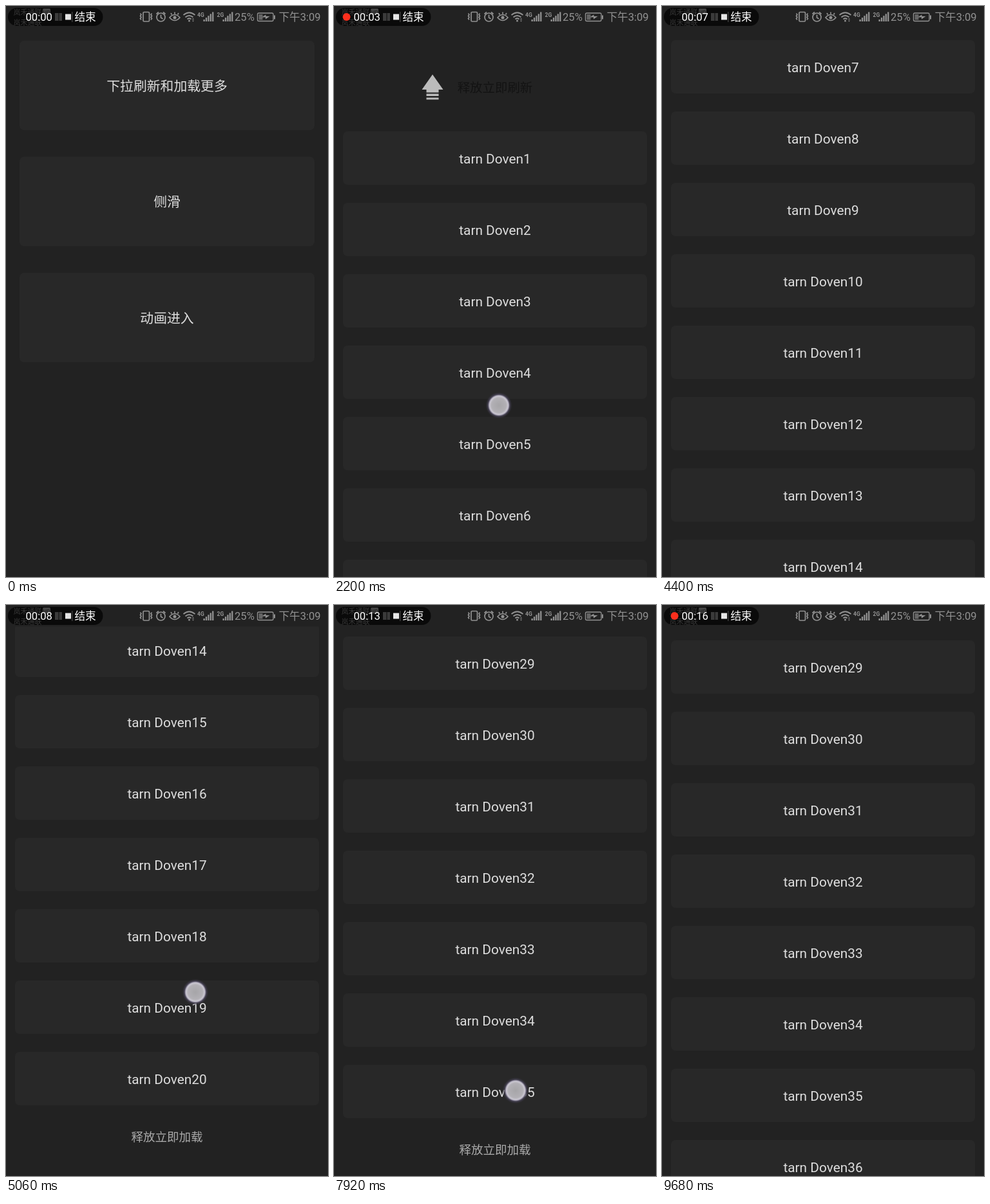
Write an HTML page that moves like this. It is 500 px wide and 888 px high and loops after 9900 ms.

```html
<!DOCTYPE html>
<html lang="zh-CN">
<head>
<meta charset="utf-8">
<title>下拉刷新</title>
<style>
  html, body { margin: 0; width: 100%; height: 100%; overflow: hidden; background: #222; }
  svg { display: block; width: 100vw; height: 100vh; }
  text { font-family: Roboto, "Noto Sans CJK SC", "Noto Sans CJK", sans-serif; }
  .mid { text-anchor: middle; }
  .card { fill: #282828; }
  .label { fill: #dedede; font-size: 20.83px; text-anchor: middle; }
  .head { fill: #131313; font-size: 19.44px; text-anchor: middle; }
  .foot { fill: #aaa; font-size: 18.52px; }
  .bar { fill: #929292; font-size: 16.6px; }
  .net { fill: #929292; font-size: 8.5px; font-weight: 700; }
  .carrier { fill: #383838; font-size: 11px; }
  .rec { fill: #fff; font-size: 16.6px; }
  .line { fill: none; stroke: #929292; stroke-width: 1.7; }
</style>
</head>
<body>
<svg viewBox="0 0 500 888" preserveAspectRatio="none">
  <defs>
    <radialGradient id="glow">
      <stop offset="0" stop-color="#a6a5a8"/>
      <stop offset=".55" stop-color="#b2b0b5"/>
      <stop offset=".7" stop-color="#cbc8d2"/>
      <stop offset=".77" stop-color="#8a8598"/>
      <stop offset=".82" stop-color="#4b4758" stop-opacity=".9"/>
      <stop offset="1" stop-color="#302d3c" stop-opacity="0"/>
    </radialGradient>
  </defs>
  <rect width="500" height="888" fill="#222"/>
  <g id="menu"></g>
  <g id="page">
    <rect width="500" height="888" fill="#222"/>
    <g id="header">
      <g id="arrow" fill="#bbb">
        <path d="M0-20.5 16.5 3H9.5V7.5H-9.5V3H-16.5Z"/>
        <path d="M-9.5 9.5h19v3.5h-19zM-9.5 15.5h19v3h-19z"/>
      </g>
      <g id="headSpin"></g>
      <text id="headText" class="head" x="250" y="7"></text>
    </g>
    <g id="rows"></g>
    <g id="footer">
      <g id="footSpin"></g>
      <text id="footText" class="foot" y="7"></text>
    </g>
  </g>
  <rect width="500" height="33.5" fill="#222"/>

  <g id="status">
    <rect x="3" y="3" width="147.5" height="28" rx="14" fill="#0a0a0a"/>
    <text class="carrier" x="11.5" y="13.5">岚禾通联</text>
    <text class="carrier" x="11.5" y="30">岚禾通联</text>
    <rect x="57" y="4" width="12" height="9" rx="1.5" fill="#444"/>
    <text x="63" y="11.5" class="mid" font-size="8" fill="#181818">HD</text>
    <path d="M76 11h5.5v12H76zM82.500 11H87v12h-4.500zM102 9h1.500v16H102z" fill="#3b3b3b"/>
    <circle id="dot" cx="19.500" cy="17" r="6" fill="#fb2f1d"/>
    <text id="clock" class="rec" x="30.500" y="23"></text>
    <rect x="92" y="12.500" width="9" height="9" fill="#e6e6e6"/>
    <text class="rec" x="106.500" y="23">结束</text>

    <g class="line">
      <rect x="213" y="9.500" width="9.500" height="14.500" rx="1.500"/>
      <path d="M208.500 11.500l1.500 2-1.500 2 1.500 2-1.500 2 1.500 2M226.500 11.500l-1.500 2 1.500 2-1.500 2 1.500 2-1.500 2"/>
      <circle cx="240.500" cy="17.500" r="6.500"/>
      <path d="M240.500 13.500v4.500l3 2M233.500 12.500l3.500-3M247.500 12.500l-3.500-3"/>
      <path d="M254 18q8-9 16 0q-8 9-16 0zM262 9.500v3M256 11l1.500 2.500M268 11l-1.500 2.500"/>
      <path d="M275.500 14q9-7.500 18 0M278.500 17.500q6-5 12 0M281.500 20.500q3-2.500 6 0"/>
      <rect x="390.500" y="11" width="24.500" height="12.500" rx="2" stroke-width="1.300"/>
    </g>
    <g fill="#929292">
      <circle cx="262" cy="18" r="2.500"/>
      <circle cx="284.500" cy="23" r="1.500"/>
      <path d="M289 21l1.500-2 1.500 2zM289 22.500l1.500 2 1.500-2z"/>
      <path d="M416 14.500h2v6h-2z"/>
      <path d="M392.500 13h6v8.500h-6z" opacity=".6"/>
      <path d="M397 17.500l6.500-4v2.500h6l-6.500 4.500v-3z"/>
    </g>
    <g id="signal" fill="#929292"></g>
    <text class="net" x="297" y="16.500" textLength="">4G</text>
    <text class="net" x="327.500" y="16.500">2G</text>
    <text class="bar" x="355" y="23">25%</text>
    <text class="bar" x="423.500" y="23">下午3:09</text>
  </g>

  <g id="toast">
    <rect id="toastBox" y="755" height="44" rx="22" fill="#b8b3b7" opacity=".95"/>
    <text id="toastText" class="mid" x="250" y="784" font-size="18.06" fill="#111"></text>
  </g>
  <circle id="touch" r="20.500" fill="url(#glow)"/>
</svg>

<script>
const LOOP = 9900, STEP = 220, PITCH = 111, TOP = 47, HEADER = 108;
const $ = id => document.getElementById(id);

// step, scroll, then touch x and y while a finger is down
const track = [
  [0, 0], [1, 0, 256, 130], [2, 0, 256, 130], [3, 0],
  [6, 0, 250, 325], [7, -30, 251, 385], [8, -72, 252, 470], [9, -118, 254, 560],
  [10, -148, 256, 621], [11, -HEADER], [17, -48], [18, 0, 272, 660],
  [19, 220, 285, 440], [20, 660], [21, 1180], [22, 1400, 292, 725],
  [23, 1461, 294, 602], [24, 1468, 295, 588], [25, 1435],
  [32, 1600, 268, 600], [33, 2080], [34, 2680], [35, 3062, 278, 842],
  [36, 3106, 282, 755], [37, 3146, 333, 675], [38, 3100]
];

const shift = (el, x, y, turn = 0) =>
  el.setAttribute('transform', `translate(${x} ${y}) rotate(${turn})`);
const show = (el, on) => el.style.display = on ? '' : 'none';
const within = (k, from, to) => k >= from && k <= to;

const card = (x, y, w, h, label) =>
  `<rect class="card" x="${x}" y="${y}" width="${w}" height="${h}" rx="7"/>` +
  `<text class="label" x="250" y="${y + h / 2 + 8}">${label}</text>`;

function ring() {
  const n = 36, r = 13.2;
  let out = '';
  for (let i = 0; i < n; i++) {
    const a = i / n * 2 * Math.PI, b = (i + 1.15) / n * 2 * Math.PI;
    const c = Math.round(80 + 135 * i / n);
    out += `<path d="M${r * Math.cos(a)} ${r * Math.sin(a)}A${r} ${r} 0 0 1 ${r * Math.cos(b)} ${r * Math.sin(b)}"
      fill="none" stroke="rgb(${c},${c},${c})" stroke-width="3.6"/>`;
  }
  return out;
}

$('menu').innerHTML = ['下拉刷新和加载更多', '侧滑', '动画进入']
  .map((label, i) => card(21, 54 + i * 180.5, 458, 139, label)).join('');
$('headSpin').innerHTML = $('footSpin').innerHTML = ring();
$('signal').innerHTML = [306.5, 336.5].map(x => [0, 1, 2, 3, 4].map(i =>
  `<rect x="${x + i * 3.4}" y="${21 - i * 2.9}" width="2.3" height="${3 + i * 2.9}"/>`).join('')).join('');

function drawRows(scroll, count) {
  let out = '';
  for (let i = 0; i < count; i++) {
    const y = TOP + i * PITCH - scroll;
    if (y > -90 && y < 888) out += card(14, y, 472, 83, 'tarn Doven' + (i + 1));
  }
  $('rows').innerHTML = out;
}

function drawHeader(k, scroll) {
  const busy = within(k, 11, 15), done = within(k, 16, 17);
  const ready = scroll < -HEADER;
  shift($('header'), 0, -21 - scroll);
  show($('header'), scroll < 0);
  show($('arrow'), !busy && !done);
  show($('headSpin'), busy);
  shift($('arrow'), 153, 0, ready ? 0 : 180);
  shift($('headSpin'), 153, 0, k * 130);
  $('headText').textContent = done ? '刷新完成' : busy ? '正在刷新...'
    : ready ? '释放立即刷新' : '下拉可以刷新';
}

function drawFooter(k, scroll, count) {
  const busy = within(k, 25, 30) || within(k, 38, 43);
  const y = TOP + count * PITCH - scroll + 21;
  shift($('footer'), 0, y);
  show($('footSpin'), busy);
  shift($('footSpin'), 171.5, -1, k * 130 - 190);
  const text = $('footText');
  text.textContent = busy ? '正在加载中...' : y < 853 ? '释放立即加载' : '上拉加载更多';
  text.setAttribute('x', busy ? 196 : 250);
  text.style.textAnchor = busy ? 'start' : 'middle';
}

function drawToast(k) {
  const refresh = within(k, 11, 15);
  const w = refresh ? 106 : 142;
  show($('toast'), refresh || within(k, 25, 29) || within(k, 38, 42));
  $('toastBox').setAttribute('x', 250 - w / 2);
  $('toastBox').setAttribute('width', w);
  $('toastText').textContent = refresh ? '触发刷新' : '触发加载更多';
}

function draw(k) {
  const [at, scroll, tx, ty] = track.filter(p => p[0] <= k).pop();
  const count = k < 31 ? 20 : k < 44 ? 35 : 50;
  show($('page'), k >= 3);
  shift($('page'), k === 3 ? 170 : 0, 0);
  drawRows(scroll, count);
  drawHeader(k, scroll);
  drawFooter(k, scroll, count);
  drawToast(k);

  show($('touch'), at === k && tx !== undefined);
  shift($('touch'), tx || 0, ty || 0);

  const sec = 0.2 + 0.366 * k, part = sec % 1;
  $('clock').textContent = '00:' + String(Math.floor(sec)).padStart(2, '0');
  show($('dot'), k > 0 && (part < 0.35 || part > 0.7));
}

const start = performance.now();
let last = -1;
function tick() {
  const k = Math.floor((performance.now() - start) % LOOP / STEP);
  if (k !== last) draw(last = k);
  requestAnimationFrame(tick);
}
tick();
</script>
</body>
</html>
```
